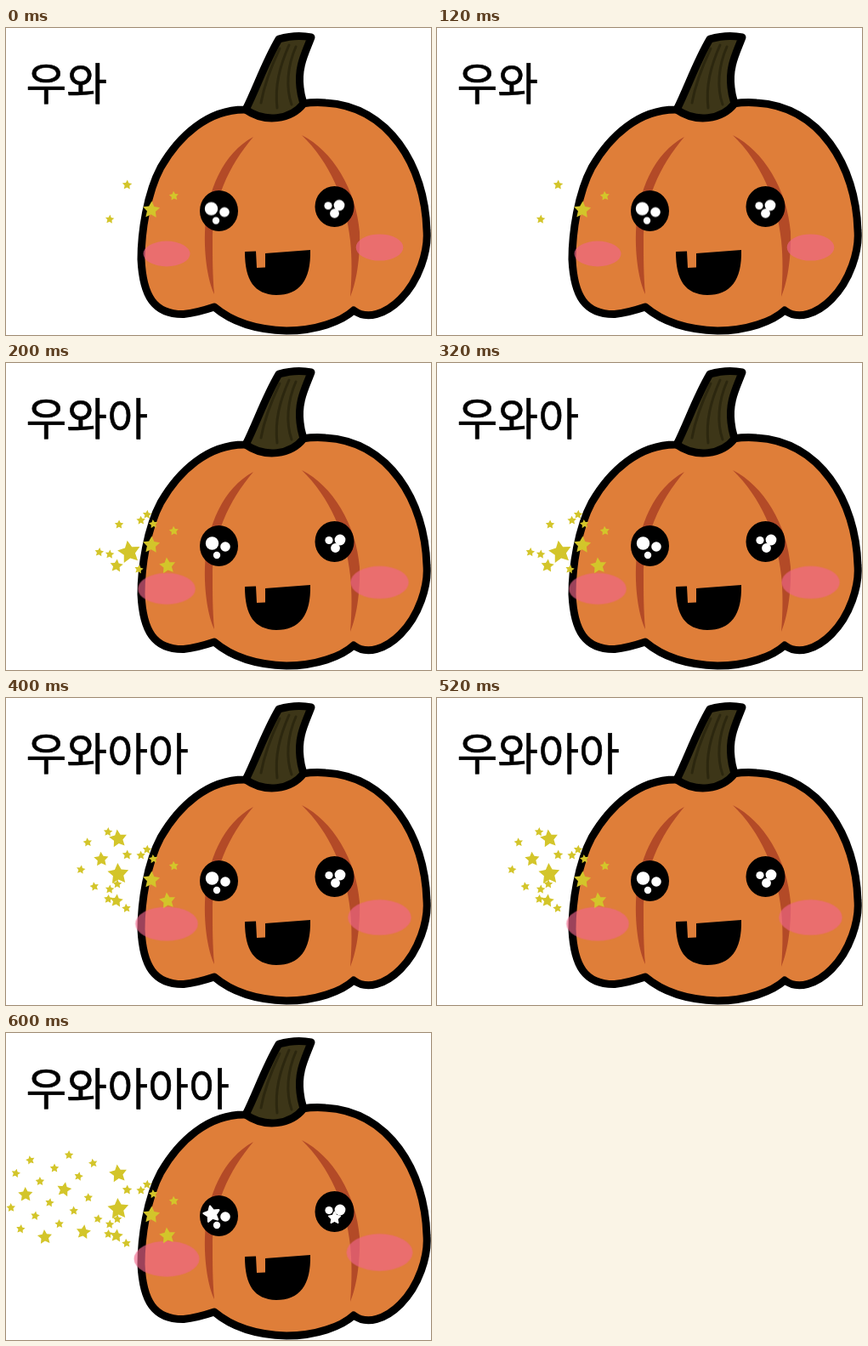
Write an HTML page that moves like this. It is 500 by 361 pixels and loops after 800 ms.

```html
<!DOCTYPE html>
<html lang="ko">
<head>
<meta charset="utf-8">
<title>우와</title>
<style>
  html, body { margin: 0; width: 100%; height: 100%; overflow: hidden; background: #fff; }
  svg { display: block; width: 100%; height: 100%; }
  text { font: 52px "Noto Sans CJK KR", "Noto Sans CJK", sans-serif; stroke: #000; stroke-width: .6; stroke-linejoin: round; }
  .outline { stroke: #000; stroke-width: 9; stroke-linejoin: round; }

  /* visibility over four equal steps */
  .only1, .only2, .from1, .from2, .from3, .not1, .not3 { animation: only .8s step-end infinite; }
  .only1 { animation-delay: -.6s; }
  .only2 { animation-delay: -.4s; }
  .from1 { animation-name: from1; }
  .from2 { animation-name: from2; }
  .from3 { animation-name: from3; }
  .not1 { animation-name: not1; }
  .not3 { animation-name: not3; }
  @keyframes only { 0% { visibility: visible } 25%, 100% { visibility: hidden } }
  @keyframes from1 { 0% { visibility: hidden } 25%, 100% { visibility: visible } }
  @keyframes from2 { 0% { visibility: hidden } 50%, 100% { visibility: visible } }
  @keyframes from3 { 0% { visibility: hidden } 75%, 100% { visibility: visible } }
  @keyframes not1 { 0% { visibility: visible } 25% { visibility: hidden } 50%, 100% { visibility: visible } }
  @keyframes not3 { 0% { visibility: visible } 75%, 100% { visibility: hidden } }

  .cheek { fill: #f0668b; opacity: .65; transform-box: fill-box; transform-origin: center; animation: blush .8s step-end infinite; }
  @keyframes blush {
    0% { transform: scale(1) }
    25% { transform: scale(1.23) }
    50% { transform: scale(1.34) }
    75%, 100% { transform: scale(1.4) }
  }

  .glints { fill: #fff; animation: look .8s step-end infinite; }
  @keyframes look {
    0% { transform: translate(-1px, .5px) }
    25%, 100% { transform: none }
  }
  .glints use { stroke: #fff; stroke-width: .25; stroke-linejoin: round; }
</style>
</head>
<body>
<svg viewBox="0 0 500 361">
  <defs><path id="star"/></defs>

  <text x="23.5" y="85">우와<tspan class="from1">아</tspan><tspan class="from2">아</tspan><tspan class="from3">아</tspan></text>

  <path class="outline" fill="#df7e39" d="M280 96C238 96 204 126 182 164C166 194 159 240 159 272C161 315 174 337 209 336.5C224 335 236 331 245 328C265 345 295 355 330 356C365 356 395 345 409 332C425 344 447 336 464 319C486 297 497 262 495 238C493 162 450 92 376 88C366 87 355 88 348 89Z"/>
  <g fill="#b34a27">
    <path d="M291 128C256 147 236 190 234 240C233 270 238 298 245 313C243 290 243 270 243 252C242 205 262 162 291 128Z"/>
    <path d="M348 126C384 144 412 190 416 240C417 270 412 300 405 316C407 290 407 270 405 250C400 202 381 158 348 126Z"/>
  </g>
  <path class="outline" fill="#3d3618" d="M321 13C335 9 346 8 359 11C352 30 343 45 346 70C347 80 349 85 350 89C335 108 305 112 282 96C295 70 305 40 321 13Z"/>
  <g fill="none" stroke="#2c270f" stroke-width="3" stroke-linecap="round">
    <path d="M322 24C312 45 304 66 300 88"/>
    <path d="M333 20C322 45 316 68 319 94"/>
    <path d="M341 22C331 45 329 70 336 90"/>
  </g>

  <path d="M281 263L294 262.5L295 282L305 281.5L305 265L358 261C359 297 345 314 318 314C292 313 281 297 281 263Z"/>
  <ellipse class="cheek" cx="189" cy="265.5" rx="27.5" ry="15"/>
  <ellipse class="cheek" cx="439.5" cy="258" rx="27.8" ry="15.6"/>

  <ellipse cx="250.5" cy="215" rx="22.5" ry="24"/>
  <ellipse cx="386.5" cy="210" rx="23" ry="24"/>
  <g class="glints">
    <circle class="not3" cx="242.5" cy="212" r="7.7"/>
    <use class="from3" href="#star" transform="translate(242 213) rotate(-12) scale(9.5)"/>
    <circle cx="258" cy="216" r="5.8"/>
    <circle cx="248" cy="226" r="4.2"/>
    <circle cx="380" cy="208.5" r="4.6"/>
    <circle cx="393" cy="208" r="6.4"/>
    <circle class="not3" cx="387.5" cy="217.5" r="5.4"/>
    <use class="from3" href="#star" transform="translate(386.5 217.5) scale(7)"/>
  </g>
  <g id="sparks" fill="#d3c52a"></g>
</svg>
<script>
  const sparks = document.getElementById('sparks');

  function starPath() {
    let d = '';
    for (let i = 0; i < 10; i++) {
      const r = i % 2 ? 0.5 : 1, a = Math.PI * (i / 5 - 0.5);
      d += (i ? 'L' : 'M') + (r * Math.cos(a)).toFixed(3) + ' ' + (r * Math.sin(a)).toFixed(3);
    }
    return d + 'Z';
  }
  document.getElementById('star').setAttribute('d', starPath());

  function star(name, x, y, r) {
    const el = document.createElementNS('http://www.w3.org/2000/svg', 'use');
    const tilt = (x * 7 + y * 3) % 24 - 12;
    el.setAttribute('href', '#star');
    el.setAttribute('class', name);
    el.setAttribute('transform', `translate(${x} ${y}) rotate(${tilt}) scale(${r})`);
    sparks.append(el);
  }

  // Even spread over a box: regular columns, golden-ratio heights, every fourth star large.
  function scatter(name, count, left, top, width, height) {
    for (let i = 0; i < count; i++) {
      const x = left + width * (i + 0.5) / count;
      const y = top + height * ((i + 1) * 0.618 % 1);
      star(name, x, y, i % 4 === 3 ? 9 : 5.5);
    }
  }

  star('', 171, 214, 10.5);
  star('', 197.5, 197.5, 5.8);
  star('', 122, 225, 5.5);
  star('not1', 142.5, 184.5, 6);
  star('only1', 145, 222.5, 14);
  star('from1', 190, 238.5, 10);
  star('from1', 130, 238.5, 8);
  star('from2', 132, 165.5, 11);
  star('from2', 132, 207, 13);

  scatter('only1', 3, 98, 170, 70, 85);
  scatter('from1', 3, 155, 174, 22, 18);
  scatter('only2', 5, 84, 150, 40, 84);
  scatter('from2', 3, 115, 208, 32, 46);
  scatter('from3', 19, 3, 140, 108, 106);
</script>
</body>
</html>
```
